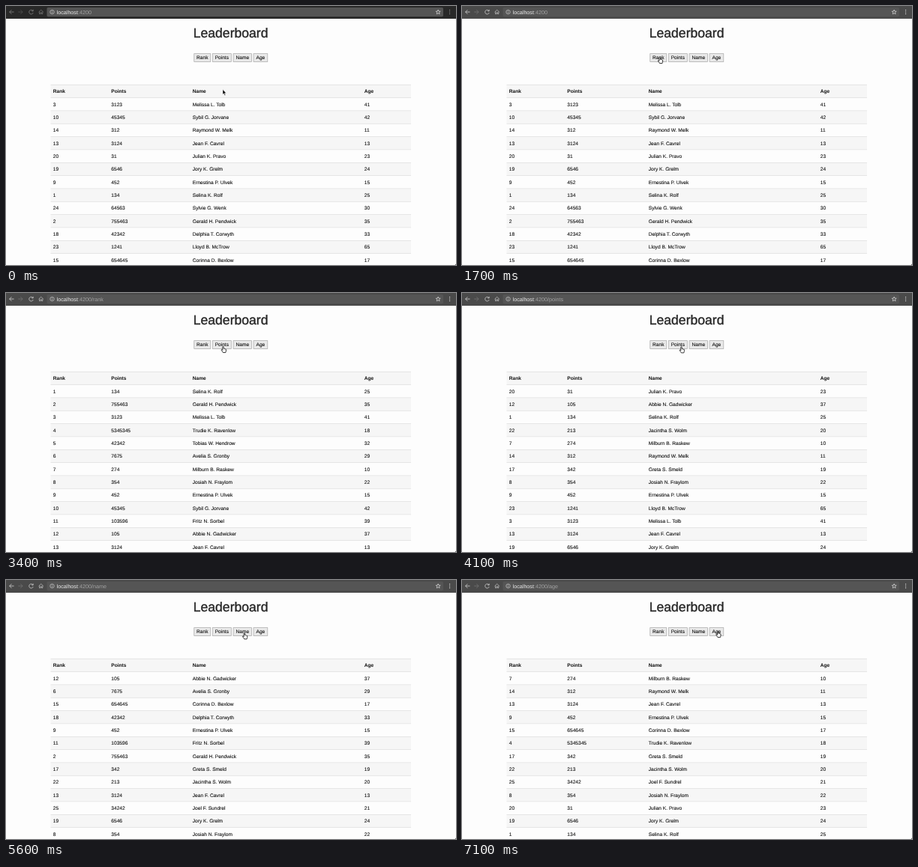
An HTML page for the animation above (8 s loop, 600 by 346 pixels).

```html
<!DOCTYPE html>
<html lang="en">
<head>
<meta charset="utf-8">
<title>Leaderboard</title>
<style>
  html, body { margin: 0; width: 100%; height: 100%; overflow: hidden; background: #fdfdfd; }
  svg { display: block; width: 600px; height: 346px; }
  text { font: 6.6px "Liberation Sans", Arial, sans-serif; fill: #111; text-rendering: geometricPrecision; white-space: pre; }
  .title { font-size: 17.6px; fill: #262626; stroke: #262626; stroke-width: .35; text-anchor: middle; }
  .head { font-weight: bold; }
  .cell, .label { stroke: #111; stroke-width: .1; }
  .label { text-anchor: middle; }
  .url { font-size: 7.2px; fill: #ececec; }
  .icon { fill: none; stroke: #d2d2d2; stroke-width: .8; stroke-linejoin: round; }
</style>
</head>
<body>
<svg id="stage" viewBox="0 0 600 346">
  <rect width="600" height="346" fill="#fdfdfd"/>
  <g id="table"></g>
  <text class="title" x="299.6" y="42">Leaderboard</text>
  <g id="buttons"></g>
  <rect id="bar" width="600" height="17"/>
  <rect x="54.5" y="2" width="528.5" height="12.2" rx="1.6" fill="#555"/>
  <g class="icon" id="controls">
    <path d="M10.6 8H4.6M7.4 5.2L4.6 8l2.8 2.8"/>
    <path d="M16.2 8h6M19.4 5.2L22.2 8l-2.8 2.8" stroke="#727272"/>
    <path d="M35.8 6.4A2.8 2.8 0 1 0 36.2 9M36.2 4.8v2h-2"/>
    <path d="M43.6 8.2L46.7 5.2l3.1 3M44.6 7.6v3h1.4V8.8h1.4v1.8h1.4v-3" stroke-width=".65"/>
    <path d="M591.6 5.5h0M591.6 8h0M591.6 10.5h0" stroke-width="1.3" stroke-linecap="round"/>
  </g>
  <g class="icon">
    <g stroke-width=".7"><circle cx="61.5" cy="8" r="2.7"/><path d="M61.5 7.5v2M61.5 6.1v.7"/></g>
    <path id="star"/>
  </g>
  <text class="url" x="67.6" y="10.6">localhost<tspan fill="#a2a2a2">:4200<tspan id="path"></tspan></tspan></text>
  <path d="M600 344.6V346h-1.4z" fill="#555"/>
  <path id="arrow" d="M0 0V6.6L1.5 5.2 2.6 7.8 3.7 7.3 2.6 4.8H4.6Z" fill="#000" stroke="#fff" stroke-width=".5"/>
  <path id="hand" d="M-1.2 .6C-1.2-.2 .2-.2 .2 .6V2.8Q1 2.4 1.4 3.1 2.2 2.8 2.5 3.5 3.4 3.3 3.4 4.3V5.6Q3.3 6.6 2.8 8.1H-.6Q-1.4 6.6-2.7 5.1-2.9 4-2 4.1L-1.2 4.9Z" fill="#fff" stroke="#111" stroke-width=".85" stroke-linejoin="round"/>
</svg>
<script>
const LOOP = 8000, STEP = 100, ROWS = 13, ROW_H = 17.34, TOP = 105.2;
const COLUMN_X = [62.8, 140.3, 248.8, 477.8];
const HEADINGS = ['Rank', 'Points', 'Name', 'Age'];

const players = `1|134|Selina K. Rolf|25
2|755463|Gerald H. Pendwick|35
3|3123|Melissa L. Tolb|41
4|5345345|Trudie K. Ravenlow|18
5|42342|Tobias W. Hendrow|32
6|7675|Avelia S. Gronby|29
7|274|Milburn B. Raskew|10
8|354|Josiah N. Fraylom|22
9|452|Ernestina P. Ulvek|15
10|45345|Sybil G. Jorvane|42
11|103596|Fritz N. Sorbel|39
12|105|Abbie N. Gadwicker|37
13|3124|Jean F. Cavrel|13
14|312|Raymond W. Melk|11
15|654645|Corinna D. Bexlow|17
17|342|Greta S. Smeld|19
18|42342|Delphia T. Corwyth|33
19|6546|Jory K. Grelm|24
20|31|Julian K. Pravo|23
22|213|Jacintha S. Wolm|20
23|1241|Lloyd B. McTrow|65
24|64563|Sylvie G. Wenk|30
25|34242|Joel F. Sundrel|21`.split('\n').map(line => line.split('|'));

const sortBy = column => [...players].sort((a, b) =>
  column === 2 ? (a[2] < b[2] ? -1 : 1) : a[column] - b[column]);
const unsorted = [3, 10, 14, 13, 20, 19, 9, 1, 24, 2, 18, 23, 15]
  .map(rank => players.find(p => +p[0] === rank));

// Each view: the button goes down at `press`, the sorted table appears at `show`.
const views = [
  { show: 0, path: '', rows: unsorted },
  ...[[2300, 2500], [3800, 4100], [5400, 5600], [6900, 7100]].map(([press, show], i) =>
    ({ press, show, path: '/' + HEADINGS[i].toLowerCase(), rows: sortBy(i) }))
];

// Pointer moves: start time, number of steps, end point, downward bow.
const moves = [
  { at: 700, steps: 5, to: [261.2, 68.6], bow: 0 },
  { at: 1600, steps: 1, to: [264.2, 68.5], bow: 0 },
  { at: 3100, steps: 5, to: [293, 71.8], bow: 0 },
  { at: 4600, steps: 5, to: [318.3, 70.8], bow: .6 },
  { at: 6200, steps: 7, to: [341.6, 68.5], bow: 1.6 }
];

const $ = id => document.getElementById(id);
function add(parent, tag, attrs, text = '') {
  const node = document.createElementNS('http://www.w3.org/2000/svg', tag);
  for (const key in attrs) node.setAttribute(key, attrs[key]);
  node.textContent = text;
  return parent.appendChild(node);
}

const table = $('table');
const cells = [];
for (let r = 0; r <= ROWS; r++) {
  const y = TOP + r * ROW_H;
  if (r % 2 === 0) add(table, 'rect', { x: 59.5, y, width: 480.5, height: ROW_H, fill: '#f6f6f6' });
  add(table, 'rect', { x: 59.5, y: y - .3, width: 480.5, height: .6, fill: '#d9d9d9' });
  const row = COLUMN_X.map((x, c) =>
    add(table, 'text', { x, y: y + 11.1, class: r ? 'cell' : 'head' }, r ? '' : HEADINGS[c]));
  if (r) cells.push(row);
}

const buttons = [[250.8, 22], [275.3, 25], [303, 24.6], [330, 18.8]].map(([x, width], i) => {
  const box = add($('buttons'), 'rect', { x, y: 63.7, width, height: 10.9, stroke: '#a6a6a6', 'stroke-width': .7 });
  add($('buttons'), 'text', { x: x + width / 2, y: 71.3, class: 'label' }, HEADINGS[i]);
  return box;
});

$('star').setAttribute('d', 'M' + Array.from({ length: 10 }, (_, i) => {
  const radius = i % 2 ? 1.4 : 3.2, angle = i * Math.PI / 5 - Math.PI / 2;
  return [576.2 + radius * Math.cos(angle), 8.2 + radius * Math.sin(angle)].map(v => v.toFixed(2));
}).join('L') + 'Z');

function pointerAt(t) {
  let [x, y] = [289, 111.6];
  for (const { at, steps, to, bow } of moves) {
    if (t < at) break;
    const p = Math.min(1, ((t - at) / STEP + 1) / steps);
    const ease = p * p * (3 - 2 * p);
    x += (to[0] - x) * ease;
    y += (to[1] - y) * ease + bow * Math.sin(Math.PI * p);
  }
  return [x, y];
}

let shown;
function showView(view) {
  if (view === shown) return;
  shown = view;
  $('path').textContent = view.path;
  cells.forEach((row, r) => row.forEach((cell, c) => { cell.textContent = view.rows[r][c]; }));
}

function render(time) {
  const t = Math.floor(time % LOOP / STEP) * STEP;
  showView(views.findLast(view => t >= view.show));
  buttons.forEach((box, i) => {
    const { press, show } = views[i + 1];
    box.setAttribute('fill', t >= press && t < show ? '#d2d2d2' : '#e9e9e9');
  });

  // The browser window gains focus with the first click.
  const focused = t >= 1300;
  $('bar').setAttribute('fill', focused ? '#4a4a4a' : '#282828');
  $('controls').setAttribute('opacity', focused ? 1 : .55);

  const [x, y] = pointerAt(t), overButton = t >= 1600;
  for (const [id, visible] of [['arrow', !overButton], ['hand', overButton]]) {
    $(id).setAttribute('transform', `translate(${x.toFixed(2)} ${y.toFixed(2)})`);
    $(id).setAttribute('visibility', visible ? 'visible' : 'hidden');
  }
}

const start = performance.now();
function tick() {
  render(performance.now() - start);
  requestAnimationFrame(tick);
}
tick();
</script>
</body>
</html>
```
